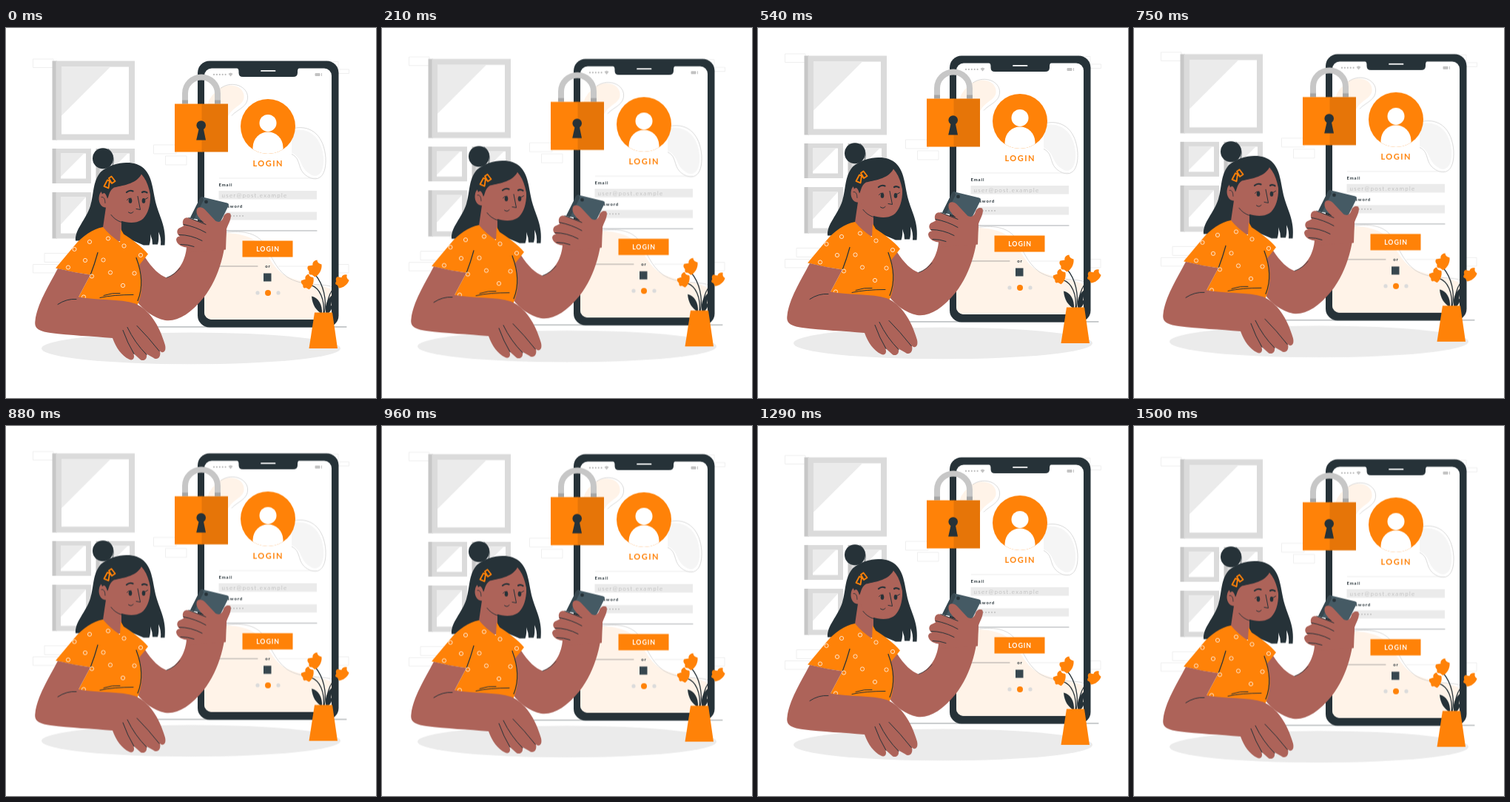
Animation, 500 px wide and 500 px high, one loop 1.54 s. Source, as an HTML page without scripts:

```html
<!DOCTYPE html>
<html lang="en">
<head>
<meta charset="utf-8">
<title>Login</title>
<style>
  html, body { margin: 0; width: 100%; height: 100%; overflow: hidden; background: #fff; }
  svg { display: block; width: 100%; height: 100%; }
  .float { animation: float 1540ms linear -40ms infinite; }
  @keyframes float { 50% { transform: translateY(-10px); } }
  .orange { fill: #ff8208; }
  .dark { fill: #263238; }
  .skin { fill: #ad6359; }
  .peach { fill: #fff3e8; }
  .pale { fill: #ebebeb; }
  .line { fill: none; stroke: #263238; stroke-linecap: round; stroke-linejoin: round; }
  .outline { fill: none; stroke: #c2c2c2; stroke-width: .6; }
  text { font-family: Lato, "Open Sans", sans-serif; font-weight: 700; }
  .label { font-size: 6px; letter-spacing: .85px; fill: #263238; }
  .hint { font-size: 8px; font-weight: 300; letter-spacing: 1.3px; fill: #a6a6a6; }
  .mid { text-anchor: middle; }
</style>
</head>
<body>
<svg viewBox="0 0 500 500">
  <defs>
    <clipPath id="screen"><rect x="268" y="55" width="172" height="339.5" rx="10"/></clipPath>
    <clipPath id="avatar"><circle cx="354" cy="133.5" r="37"/></clipPath>
    <circle id="ring" r="2.6" fill="none" stroke="#fff" stroke-width=".8"/>
    <g id="pane">
      <path fill="#c7c7c7" d="M0 0H6V47H0z"/>
      <path fill="#dbdbdb" d="M5 0H52.5V47H5z"/>
      <path fill="#fff" d="M11.5 6.5H45.5V40.5H11.5z"/>
      <path class="pale" d="M11.5 6.5H43L11.5 38z"/>
    </g>
    <path id="bloom" class="orange" d="M-9-4C-7-4-5-5-3-5C-4-9 0-12 3-12C3-9 5-7 9-6C10 1 5 9 0 11L-4 8Q-9 9-8 3C-10 1-11-2-9-4z"/>
  </defs>

  <g class="float">
    <g fill="none" stroke="#ebebeb" stroke-width=".8">
      <path d="M36.500 42.500H64V54H36.500zM52 305H86V317H52zM36.500 320H70V331.500H36.500zM199.500 158.500H230V170.500H199.500zM215.500 173.500H244V185.500H215.500z"/>
      <path d="M420 46H449V56M449 56.500H463.500V62H449M449 320H463V331.500H449"/>
    </g>

    <!-- windows -->
    <path fill="#c7c7c7" d="M62.500 45H69V152H62.500z"/>
    <path fill="#dbdbdb" d="M67.500 45H174V152H67.500z"/>
    <path fill="#fff" d="M75 53H166V144H75z"/>
    <path class="pale" d="M75 53H141L75 119z"/>
    <use href="#pane" x="62.500" y="163.500"/>
    <use href="#pane" x="121.500" y="163.500"/>
    <path fill="#c7c7c7" d="M62.500 222.500H69V285H62.500z"/>
    <path fill="#dbdbdb" d="M67.500 222.500H115V285H67.500z"/>
    <path fill="#fff" d="M74 229H108V278H74z"/>
    <path class="pale" d="M74 229H108L74 266z"/>

    <ellipse class="pale" cx="250" cy="433.500" rx="202" ry="21.500"/>
    <path class="line" stroke-width=".5" d="M205 404.500H460"/>

    <!-- large phone -->
    <rect class="dark" x="259" y="45" width="190.500" height="360" rx="16"/>
    <rect fill="#fff" x="268" y="55" width="172" height="339.500" rx="10"/>
    <g clip-path="url(#screen)">
      <path class="peach" d="M268 282C288 276 312 276 330 284C352 294 355 321 376 334C394 345 420 344 440 354V395H268z"/>
      <path class="outline" d="M290 278C318 273 337 277 347 290C357 303 362 324 380 337C400 350 424 345 440 350"/>
      <path class="peach" d="M284 86C296 74 317 76 321 89C325 104 309 105 302 117C295 128 273 122 272 108Q272 97 284 86z"/>
      <path class="outline" d="M290 82C303 72 324 77 326.500 92C328 107 313 110 305 119"/>
      <path fill="#f5f5f5" d="M386 139C410 134 426 148 429 174C431 196 421 205 411 198C396 189 402 177 386 169z"/>
      <path class="outline" d="M389 136C414 131 430 148 432 176C433 199 424 208 411 203C391 194 401 178 386 171"/>
    </g>
    <path class="dark" d="M311 54H397Q394 55 394 59V61Q394 66.500 388 66.500H320Q314.500 66.500 314.500 61V59Q314.500 55 311 54z"/>
    <path stroke="#fff" stroke-width="1.800" stroke-linecap="round" d="M345 58.500H363.500"/>
    <path stroke="#bdbdbd" stroke-width="2.200" stroke-linecap="round" stroke-dasharray="0 3.900" d="M281 63.500H297"/>
    <path fill="#c2c2c2" d="M300.500 62.500Q303.500 59.500 306.500 62.500L303.500 66z"/>
    <rect fill="#c2c2c2" x="417.500" y="61.500" width="7" height="4" rx="1"/>
    <path stroke="#c2c2c2" d="M426.500 61.500V65.500"/>

    <circle class="orange" cx="354" cy="133.500" r="37"/>
    <g fill="#fff" clip-path="url(#avatar)">
      <circle cx="354" cy="129" r="11.500"/>
      <path d="M333.500 172V162C334 149 343 141 354 141S374 149 374.500 162V172z"/>
    </g>
    <text class="orange mid" x="354.200" y="187.800" font-size="11" letter-spacing="1.500">LOGIN</text>
    <path stroke="#e3e3e3" stroke-width=".6" d="M288 203.500H420"/>
    <text class="label" x="287.500" y="215">Email</text>
    <path class="pale" d="M287.500 220.500H420V232H287.500zM287.500 249H420V260H287.500z"/>
    <text class="hint" x="291.500" y="229.300">user@post.example</text>
    <text class="label" x="287.500" y="243.200">Password</text>
    <path stroke="#b8b8b8" stroke-width="1.800" stroke-linecap="round" stroke-dasharray="0 4" d="M292 254.500H321"/>
    <path class="line" stroke-width=".4" d="M288 274.500H420M288 322.500H340"/>
    <path stroke="#dedede" stroke-width=".5" d="M368 322.500H420"/>
    <path class="orange" d="M319.500 288H387.500V310H319.500z"/>
    <text class="mid" x="354" y="302.300" font-size="8.800" letter-spacing=".9" fill="#fff">LOGIN</text>
    <text class="label mid" x="354" y="324.500">or</text>
    <path fill="#37474f" d="M348 332H358.500V343H348z"/>
    <g fill="#dbdbdb">
      <circle cx="340" cy="358.500" r="2.600"/>
      <circle class="orange" cx="354" cy="358.500" r="4"/>
      <circle cx="368" cy="358.500" r="2.600"/>
    </g>

    <!-- padlock -->
    <path fill="none" stroke="#c7c7c7" stroke-width="8" d="M242 103V89A22 22 0 0 1 286 89V103"/>
    <path fill="#a6a6a6" d="M238 98H246V103H238zM282 98H290V103H282z"/>
    <path class="orange" d="M228 103H265V168H228z"/>
    <path fill="#e67508" d="M264.500 103H300V168H264.500z"/>
    <circle class="dark" cx="263.700" cy="132" r="6.300"/>
    <path class="dark" d="M261 135H266.500L270 152H257.200z"/>

    <!-- plant -->
    <path class="line" stroke-width="1.300" d="M430 387C434 368 429 347 418 334M429 387C431 367 424 352 412 348M433 387C433 365 440 352 449 347"/>
    <path class="dark" d="M413 363C422 365 428 374 427 387C419 382 414 375 413 363zM440 362C441 371 439 380 433 387C430 378 433 368 440 362zM441 374Q441 383 434 387Q435 379 441 374z"/>
    <use href="#bloom" transform="translate(417.500 326)"/>
    <use href="#bloom" transform="translate(408 344) rotate(-8) scale(.9)"/>
    <use href="#bloom" transform="translate(454 343) rotate(24) scale(.9)"/>
    <path class="orange" d="M417 385H441L448 433.500H409.500z"/>

    <!-- back hair and neck -->
    <circle class="dark" cx="131" cy="176.800" r="14"/>
    <path class="line" stroke-width=".8" d="M138 164C148 171 147 187 139 194"/>
    <path class="dark" d="M128 195C146 180 174 179 186 190C198 201 198 219 203 239C208 257 217 270 214.500 294H209Q210 284 206 276Q207 286 205 293H198Q198 286 195 279Q196 287 193.500 294H186L158 282L112 288L94 288C93 272 108 260 114 241C119 224 117 208 128 195z"/>

    <!-- arm holding the phone -->
    <path class="skin" d="M187 309C198 326 207 334 217 338C234 331 243 313 244 296L298 264C298 298 289 337 267 365C249 387 231 398 215 395.500C199 392 186 382 177 370L179 320z"/>
    <path class="line" stroke-width=".8" d="M217 338Q228 334 235 325"/>

    <!-- shirt -->
    <path class="skin" d="M136 236L131 270C136 284 148 291 156 288V258z"/>
    <path class="orange" d="M131 269.500C117 272 103 282 93 294L67 325Q90 331 114 334L97 366Q140 376 177 376C184 362 186 342 180 321L192 306C184 296 170 286 159 279L155 272L154 290C145 284 137 277 131 269.500z"/>
    <path class="line" stroke-width="1.200" d="M124 304C121 315 118 324 114.500 333M176 311C184 332 185 352 178 369"/>
    <g>
      <use href="#ring" x="113" y="289.500"/><use href="#ring" x="92.500" y="299.500"/>
      <use href="#ring" x="107" y="314.500"/><use href="#ring" x="84" y="324"/>
      <use href="#ring" x="131.500" y="314"/><use href="#ring" x="159.500" y="295"/>
      <use href="#ring" x="182" y="307.500"/><use href="#ring" x="141" y="331"/>
      <use href="#ring" x="173.500" y="332"/><use href="#ring" x="116" y="336"/>
      <use href="#ring" x="158" y="348.500"/><use href="#ring" x="105" y="364"/>
      <use href="#ring" x="138" y="285"/>
    </g>
    <path class="line" stroke-width="1" d="M127 365Q145 361 172 361M132 362Q144 358 154 359"/>

    <!-- head -->
    <path class="skin" d="M138 212C152 203 172 205 183 197C193 206 196 218 195 232C194 245 190 255 183 260C175 265 164 264 155 261Q143 255 138 243C128 245 124 235 126 227C128 219 134 219 138 224z"/>
    <path class="dark" d="M130 225C124 209 130 193 150 186C174 177 192 190 196 212C197 224 198 236 197 244C196 226 193 209 183 198C177 210 161 213 146 216C139 220 139 229 137 231Q134 220 130 225z"/>
    <path class="line" stroke="#4a2b2a" stroke-width=".8" d="M129 229Q134 228 134 237"/>
    <path class="line" stroke-width="2.200" d="M163 222.500Q167 219 171.500 221M184 222.500Q187 220.500 190.500 223"/>
    <ellipse class="dark" cx="168" cy="234" rx="2.300" ry="3.400"/>
    <ellipse class="dark" cx="186" cy="234" rx="2.300" ry="3.400"/>
    <path class="line" stroke-width="1" d="M163.500 233Q165 230 169 230.500M188 232L191.500 230M178 228L181.500 246L176 245M165.500 249.500Q169 252.500 172 249"/>
    <g fill="none" stroke="#ff8208" stroke-width="1.900" stroke-linejoin="round">
      <path d="M132.500 214.500L137 206L140 207.500L138.500 217zM139 203.500L142.500 201L147.500 207.500L143 210.500z"/>
    </g>
    <path class="line" stroke-width=".9" d="M156 263Q147 260 142 253"/>

    <!-- hand-held phone and fingers -->
    <path fill="#455a64" d="M266 229L299 237Q302 238 300.500 241L288 266L249 257L262 231Q263.500 228 266 229z"/>
    <path fill="#37474f" d="M266 229Q263.500 228 262 231L249 257L254 259L267 233z"/>
    <circle class="dark" cx="270.500" cy="235.500" r="2.400"/>
    <path class="skin" d="M257.500 247C258 242 264 241 269 246L283 261C289 265 293 260 294 255Q297 249 303 251C306 256 301 264 298 272L297 300L244 304L244 297C235 296 230 291 230 286Q231 282 235 282C229 278 231 271 236 270L240 268C237 262 240 256 246 257L268 264Q256 254 257.500 247z"/>
    <path class="line" stroke-width="1" d="M240 266Q256 269 270 277M234 280Q250 280 265 288M247 257L270 266M236 293Q246 293 254 296"/>

    <!-- resting arm -->
    <path class="skin" d="M70 325.500Q92 331 114 334L98 364C125 369 153 366 175 373C193 381 207 401 215 429C217 438 212 441 208 437C210 446 204 450 199 446L190 441C191 448 187 451 182 449L172 440C175 447 171 451 166 448C156 443 149 433 144 419.500C116 417 87 416 60 412.500C43 410 38 406 39.500 396C42 374 57 350 70 325.500z"/>
    <path class="line" stroke-width="1" d="M70 374Q82 366 95 367M158 409Q164 426 173 441M164 405Q174 426 190 442M177 403Q192 418 207 437"/>
  </g>
</svg>
</body>
</html>
```
